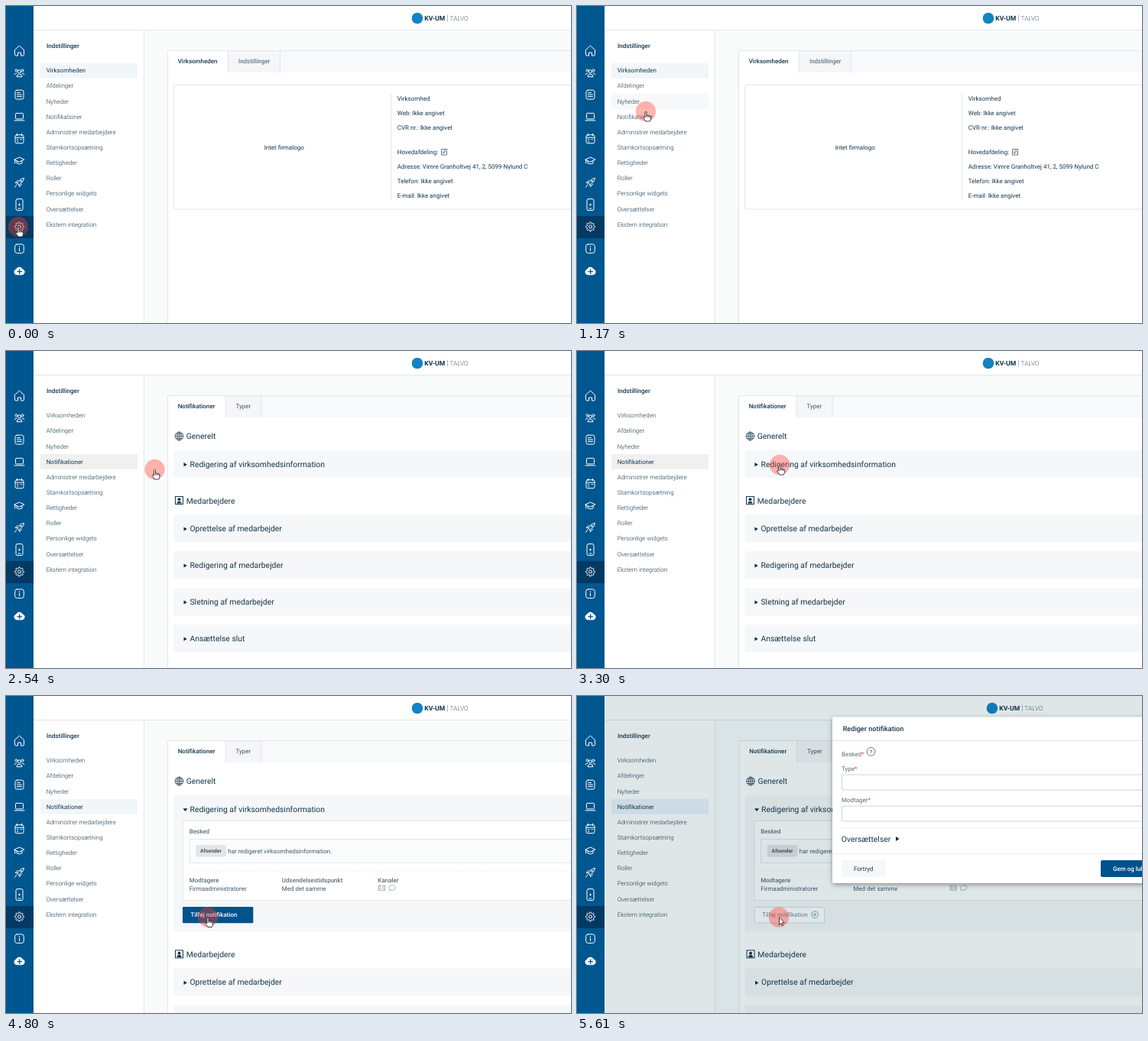
These frames come from a looping animation (739 by 415 pixels, 5.97 s). An HTML page:

```html
<!DOCTYPE html>
<html lang="da">
<head>
<meta charset="utf-8">
<title>Notifikationer</title>
<style>
html, body { margin: 0; width: 100%; height: 100%; overflow: hidden; background: #fff; }
svg { display: block; width: 100%; height: 100%; }
/* The tiny turn switches off font hinting, so small letters keep their true height. */
text { font-family: Roboto, "Open Sans", sans-serif; white-space: pre; text-rendering: geometricPrecision; transform: rotate(.01deg); }
</style>
</head>
<body>
<svg id="stage" viewBox="0 0 739 415" xmlns="http://www.w3.org/2000/svg"></svg>
<script>
const LOOP = 5970;
const INK = '#17364c', SOFT = '#40566a', LINE = '#e1e7ea', BLUE = '#00528c', PALE = '#f5f7f8';

// Drawing helpers; text is placed by the middle of its capitals.
const text = (x, y, s, { size = 8, w = 400, fill = INK, extra = '' } = {}) =>
  `<text x="${x}" y="${(y + size * .355).toFixed(2)}" font-size="${size}" font-weight="${w}" fill="${fill}" ${extra}>${s}</text>`;
const rect = (x, y, w, h, fill, extra = '') =>
  `<rect x="${x}" y="${y}" width="${w}" height="${h}" fill="${fill}" ${extra}/>`;
const line = (d, stroke = LINE, extra = '') => `<path d="${d}" fill="none" stroke="${stroke}" ${extra}/>`;
const dot = (x, y, r, extra = '') => `<circle cx="${x}" cy="${y}" r="${r}" ${extra}/>`;
const group = (id, body, extra = '') => `<g id="${id}" ${extra}>${body}</g>`;
const medium = { w: 500 };

// Sidebar
const gear = (() => {
  const pts = [];
  for (let i = 0; i < 64; i++) {
    const a = i / 64 * 2 * Math.PI, r = 5.2 + .9 * Math.tanh(2 * Math.cos(8 * a));
    pts.push((r * Math.sin(a)).toFixed(2) + ' ' + (r * Math.cos(a)).toFixed(2));
  }
  return `<path d="M${pts.join('L')}Z"/>` + dot(0, 0, 2);
})();
const box = (x, y, w, h, r) => rect(x, y, w, h, 'none', `rx="${r}"`);
const icons = [
  '<path d="M-6-1L0-6.5 6-1V5Q6 6.5 4.5 6.5H2V2.5H-2V6.5H-4.5Q-6 6.5-6 5Z"/>',
  dot(0, -1.5, 2) + dot(-4, -3, 1.5) + dot(4, -3, 1.5) + '<path d="M-3.5 5Q-3.5 2 0 2T3.5 5ZM-6.3 2.5Q-6 .5-3.5.5M6.3 2.5Q6 .5 3.5.5"/>',
  box(-5.5, -6, 11, 12, 2.5) + '<path d="M-3-2.5H1M-3 0H3M-3 2.5H3"/>',
  box(-5, -4.5, 10, 7.5, 1) + '<path d="M-6.5 5H6.5"/>',
  box(-5.5, -5, 11, 11, 2) + '<path d="M-5.5-1.5H5.5M-3-6.5V-4M3-6.5V-4M-3 1H-1.5M1.5 1H3M-3 3.5H-1.5"/>',
  '<path d="M-6.5-1.5L0-4.5 6.5-1.5 0 1.5ZM-3.5 0V3.3Q0 5.5 3.5 3.3V0M-5.8-1V3.5"/>',
  '<path d="M-2.5.5Q0-5 6-6 5 0-.5 2.5ZM-2.5.5L-5.5 0-2-3M-.5 2.5L0 5.5 3 2M-3.5 2.5L-6 6"/>' + dot(2, -2, 1),
  box(-4.5, -7.5, 9, 15, 2) + '<path d="M0-1V1M-1 0H1M-1.5 5H1.5"/>',
  gear,
  box(-5.8, -5.8, 11.6, 11.6, 2.8) + '<path d="M0-.5V3M0-3V-2.2"/>',
  `<path d="M-3.5 5.2A3.5 3.5 0 0 1-4.2-1.6 4.5 4.5 0 0 1 4-1.8 3.6 3.6 0 0 1 3.8 5.2Z" fill="#fff"/><path d="M.2-1.5V4M-2.5 1.2H3" stroke="${BLUE}" stroke-width="1.3"/>`
];
const sidebar = rect(0, 0, 36, 415, '#00568f') + rect(0, 275, 36, 29, '#023a64') +
  icons.map((s, i) => `<g transform="translate(17.5 ${58.5 + i * 28.8})" fill="none" stroke="#fff" stroke-width="1" stroke-linejoin="round" stroke-linecap="round">${s}</g>`).join('');

// Settings menu
const items = ['Virksomheden', 'Afdelinger', 'Nyheder', 'Notifikationer', 'Administrer medarbejdere', 'Stamkortsopsætning',
  'Rettigheder', 'Roller', 'Personlige widgets', 'Oversættelser', 'Ekstern integration'];
const rowY = i => 84.4 + i * 20.15;
const menu = rect(36, 32, 144.5, 383, '#fff') + line('M180.5 32V415') +
  text(53, 52.5, 'Indstillinger', { size: 8.1, w: 500 }) +
  items.map((s, i) => rect(45, rowY(i) - 9.8, 127, 19.8, PALE, `id="row${i}" rx="1"`) +
    text(52.7, rowY(i), s, { w: 300, extra: `id="item${i}"` })).join('');

const header = rect(36, 0, 703, 31, '#fff') + line('M36 31.5H739') + group('brand',
  dot(538, 16, 7.3, 'fill="#1283c4"') +
  text(547.3, 16, 'KV-UM', { size: 8.6, w: 700, fill: '#12324a' }) +
  line('M577.5 11.5V20.5', '#9aa8b2', 'stroke-width=".8"') +
  text(580.5, 16, 'TALVO', { size: 8.3, w: 300, fill: '#4a5f70' }));

// Content
const tabs = (first, second, x1, x2) =>
  rect(211.5, 58, 540, 29, '#f7f9fa') + rect(211.5, 58, x1 - 211.5, 30, '#fff') + rect(x1, 58, x2 - x1, 29, '#f4f6f8') +
  line(`M211.5 415V58.5H739M${x1} 58V87.5M${x2} 58V87.5`) +
  text(224.7, 72.3, first, medium) + text(x1 + 13.5, 72.3, second, { w: 400, fill: SOFT });

const company = tabs('Virksomheden', 'Indstillinger', 290.5, 358.5) +
  rect(219.5, 103.5, 540, 162.5, '#fff', `stroke="${LINE}" rx="1"`) + line('M503.5 115V253.5') +
  text(337.7, 184.7, 'Intet firmalogo') +
  [[121, 'Virksomhed'], [140.3, 'Web: Ikke angivet'], [159.3, 'CVR nr.: Ikke angivet'], [191, 'Hovedafdeling:'],
   [210, 'Adresse: Vimre Granholtvej 41, 2, 5099 Nylund C'], [229, 'Telefon: Ikke angivet'], [248, 'E-mail: Ikke angivet']]
    .map(([y, s]) => text(511.8, y, s)).join('') +
  line('M575 187.5H569.5V195H576.5V190M571.5 193L572 191 576 186.7 577.3 188 573.2 192.3Z', SOFT, 'stroke-width=".8"');

const big = { size: 10.4 };
const closed = 'M232.5-2.6L236.8 0 232.5 2.6Z', opened = 'M231.5-1.5H237.5L234.5 2.3Z';
const bar = (y, s, h = 36, mark = closed) =>
  rect(219.5, y - 18, 540, h, PALE, 'rx="2"') +
  `<path d="${mark}" transform="translate(0 ${y + .7})" fill="#10283a"/>` + text(240.5, y, s, big);

const globe = `<g transform="translate(226.5 111.5)" fill="none" stroke="${INK}" stroke-width=".75">` + dot(0, 0, 5.4) +
  '<ellipse rx="2.6" ry="5.4"/><path d="M0-5.4V5.4M-5.4 0H5.4M-4.6-2.8H4.6M-4.6 2.8H4.6"/></g>';
const person = `<g transform="translate(226.5 195.5)" fill="${INK}">` + rect(-5, -5, 10, 10, 'none', `stroke="${INK}"`) +
  dot(0, -1.2, 2) + '<path d="M-3 4Q-3 1.2 0 1.2T3 4Z"/></g>';

const plus = (x, y, color, id) => `<g id="${id}" fill="none" stroke="${color}" stroke-width=".8">` + dot(x, y, 4.4) +
  `<path d="M${x - 2.4} ${y}H${x + 2.4}M${x} ${y - 2.4}V${y + 2.4}"/></g>`;
const label = { w: 500, fill: '#5d6e7a' };
const detail = bar(148, 'Redigering af virksomhedsinformation', 178.5, opened) +
  rect(231.5, 163.5, 540, 104, '#fff', `stroke="${LINE}"`) + text(239.7, 177, 'Besked', label) +
  rect(240, 187.5, 540, 31, '#fafcfc', `stroke="${LINE}"`) +
  rect(248.3, 195, 39.7, 15.5, '#e3e5e7', 'rx="2"') +
  text(254, 203, 'Afsender', { size: 6.8, w: 700, fill: '#4c555c' }) +
  text(290.3, 202.7, 'har redigeret virksomhedsinformation.', { w: 400, fill: SOFT }) +
  line('M240 229.5H739', '#eef1f3', 'stroke-dasharray="1 1"') +
  [[239.7, 'Modtagere', 'Firmaadministratorer'], [360.8, 'Udsendelsestidspunkt', 'Med det samme'], [486.4, 'Kanaler', '']]
    .map(([x, a, b]) => text(x, 241, a, label) + text(x, 252.2, b, { w: 400, fill: SOFT })).join('') +
  line('M487.5 248.3H495.5V254.3H487.5ZM487.5 248.3L491.5 252 495.5 248.3M487.5 254.3L490.3 251M495.5 254.3L492.7 251', '#8a98a3', 'stroke-width=".7"') +
  line('M501.5 254.8L502 253A4.2 3.2 0 1 1 504.2 254Z', '#8a98a3', 'stroke-width=".7"') +
  rect(231.5, 276.5, 91.5, 20.5, '#fff', `stroke="#d3dbe0" rx="1"`) +
  text(241.6, 286.3, 'Tilføj notifikation', { fill: '#71818c' }) + plus(310.5, 286.3, '#7a9a96', 'addIcon') +
  group('addHover', rect(231, 276, 92.3, 21.3, BLUE, 'rx="1"') +
    text(241.6, 286.3, 'Tilføj notifikation', { w: 500, fill: '#fff' }) + plus(310.5, 286.3, '#1b5f7f', 'addIconHover'));

const notices = tabs('Notifikationer', 'Typer', 287, 334) + globe + text(235.8, 111.7, 'Generelt', big) +
  group('shut', bar(148, 'Redigering af virksomhedsinformation')) + group('open', detail) +
  group('below', person + text(235.8, 196, 'Medarbejdere', big) +
    ['Oprettelse af medarbejder', 'Redigering af medarbejder', 'Sletning af medarbejder', 'Ansættelse slut']
      .map((s, i) => bar(232.3 + i * 48, s)).join(''));

// Dialog
const field = (y, s) => text(346, y, `${s}<tspan fill="#e0483e">*</tspan>`, { fill: '#5a6b78' });
const input = y => rect(346.5, y, 420, 20, '#fff', 'stroke="#ccd5da" rx="1"');
const dialog = rect(334, 27.5, 430, 217.5, '#fff', 'rx="2" filter="url(#shade)"') +
  text(347.7, 42.5, 'Rediger notifikation', { size: 9.1, w: 500 }) + line('M334 58.5H739') +
  field(75.8, 'Besked') + dot(384.5, 72.8, 5.4, `fill="none" stroke="${SOFT}" stroke-width=".8"`) +
  text(384.5, 72.9, '?', { size: 7.5, fill: SOFT, extra: 'text-anchor="middle"' }) +
  field(95, 'Type') + input(103) + field(136.3, 'Modtager') + input(144) +
  line('M346 172.5H739M334 206.5H739', '#d9dfe3', 'stroke-dasharray="1 1"') +
  text(345.8, 187.3, 'Oversættelser', big) + '<path d="M417 184L421.5 187 417 190Z" fill="#10283a"/>' +
  rect(346, 215, 58, 22, '#f5f7f9', 'rx="2"') + text(362, 226.2, 'Fortryd') +
  rect(685, 215, 70, 22, BLUE, 'rx="2"') + text(701, 226.2, 'Gem og luk', { w: 500, fill: '#fff' });

// Pointer: hot spot at 0,0
const hand = '<path d="M-1 1Q0-.6 1 1V5.2Q2.2 4.4 2.9 5.5 4.1 4.8 4.7 6 6.2 5.5 6.4 7V9.5Q6.3 11.5 5.3 13H-.2Q-1.2 11-3.2 8.6-3.4 7-1.8 7.4L-1 8.2ZM1 5.2V7.5M2.9 5.5V7.6M4.7 6V7.8" fill="#fff" stroke="#222" stroke-width=".85" stroke-linejoin="round"/>';
const arrow = '<path d="M.5.3V10L2.7 7.9 4.2 11.2 5.7 10.5 4.3 7.3H7.3Z" fill="#fff" stroke="#222" stroke-width=".85" stroke-linejoin="round"/>';
const pointer = dot(0, 0, 13.2, 'fill="#ff3c30" opacity=".38"') + group('hand', hand) + group('arrow', arrow);

const stage = document.getElementById('stage');
stage.innerHTML =
  `<defs><filter id="shade" x="-10%" y="-10%" width="120%" height="125%"><feDropShadow dx="0" dy="2" stdDeviation="3" flood-color="#000" flood-opacity=".38"/></filter></defs>` +
  rect(0, 0, 739, 415, '#f9fbfb') +
  group('main', rect(211.5, 58, 540, 357, '#fff') + group('company', company) + group('notices', notices)) +
  menu + header + group('veil', rect(36, 0, 703, 415, '#003c46', 'opacity=".125"')) +
  sidebar + group('dialog', dialog) + group('pointer', pointer);

const $ = id => document.getElementById(id);
const show = (id, on) => $(id).setAttribute('visibility', on ? 'visible' : 'hidden');
const fade = (id, v) => $(id).setAttribute('opacity', v.toFixed(3));
const move = (id, x, y) => $(id).setAttribute('transform', `translate(${x.toFixed(2)} ${y.toFixed(2)})`);
const ramp = (t, a, b) => Math.min(1, Math.max(0, (t - a) / (b - a)));
const ease = p => p * p * (3 - 2 * p);

// time, x, y of the pointer
const path = [[0, 16, 289], [330, 16, 289], [1020, 74, 127], [1175, 90, 138], [2180, 90, 138],
  [2540, 194.5, 155], [2960, 265, 149], [3620, 265, 149], [4150, 267, 259], [4300, 267, 259], [4680, 264, 289.5], [LOOP, 264, 289.5]];
function pointerAt(t) {
  const i = Math.max(1, path.findIndex(p => p[0] >= t));
  const [t0, x0, y0] = path[i - 1], [t1, x1, y1] = path[i];
  const p = ease(ramp(t, t0, t1));
  return [x0 + (x1 - x0) * p, y0 + (y1 - y0) * p];
}

const PAGE = 1620, EXPAND = 3480, MODAL = 4830;

function draw(t) {
  const [x, y] = pointerAt(t);
  const onPage = t >= PAGE, expanded = t >= EXPAND, modal = ramp(t, MODAL, MODAL + 90);
  show('company', !onPage);
  show('notices', onPage);
  show('shut', onPage && !expanded);
  show('open', onPage && expanded);
  move('below', 0, expanded ? 142.4 : 0);

  // The row highlight trails the pointer slightly.
  const [hx, hy] = pointerAt(Math.max(0, t - 80));
  const hover = hx > 45 && hx < 172 ? Math.round((hy - rowY(0)) / 20.15) : -1;
  const active = onPage ? 3 : 0;
  items.forEach((_, i) => {
    const row = $('row' + i), on = i === active;
    show('row' + i, on || i === hover);
    row.setAttribute('fill', !on ? '#f7f8f9' : modal ? '#e9f2fb' : onPage && !expanded ? '#f0f0f0' : '#f1f6f9');
    $('item' + i).setAttribute('font-weight', on ? 400 : 300);
  });

  const blue = ramp(t, 4480, 4620) * (1 - ramp(t, 5060, 5220));
  fade('addHover', onPage && expanded ? blue : 0);
  $('addIcon').setAttribute('stroke', modal ? '#4f9c86' : '#7a9a96');

  fade('veil', modal);
  fade('dialog', modal);
  move('main', modal ? .6 : 0, 0);
  move('brand', modal ? 5 : 0, 0);

  const overButton = y > 276 && x > 231;
  const isHand = t < 3700 || (overButton && !modal);
  show('hand', isHand);
  show('arrow', !isHand);
  move('pointer', x, y);
}

const start = performance.now();
function tick() {
  draw((performance.now() - start) % LOOP);
  requestAnimationFrame(tick);
}
draw(0);
tick();
</script>
</body>
</html>
```
